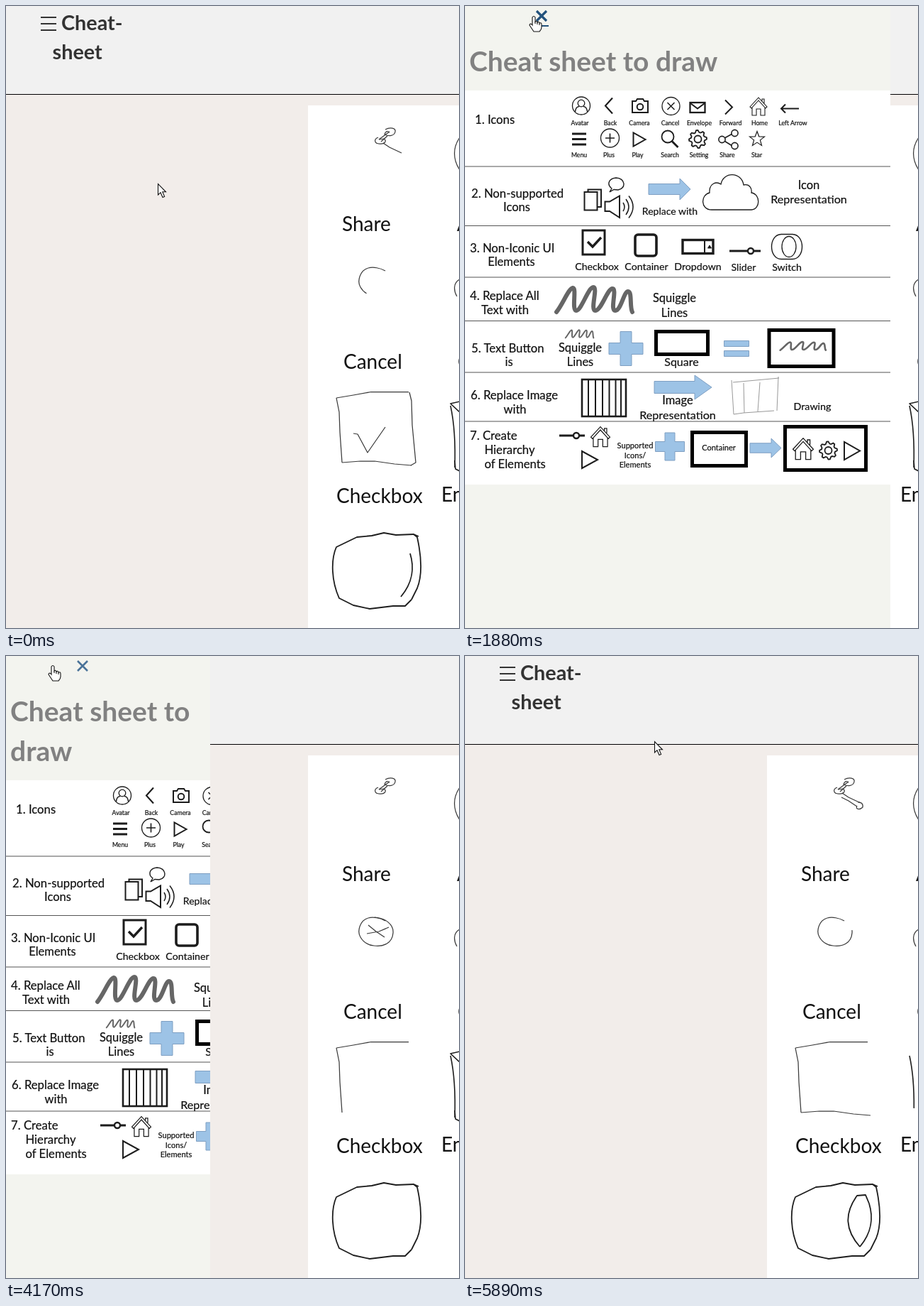
An HTML page that plays this animation: 639x876 px, repeating every 5.98 s.

```html
<!DOCTYPE html>
<html lang="en">
<head>
<meta charset="utf-8">
<title>Cheat sheet panel</title>
<style>
  html, body { margin: 0; width: 100%; height: 100%; overflow: hidden; background: #f2edea; }
  body { position: relative; font-family: Lato, "Open Sans", sans-serif; }
  svg { display: block; font-family: Lato, "Open Sans", sans-serif; }
  #page, #nav, #close, #cursor { position: absolute; left: 0; top: 0; }
  #nav { width: 0; height: 100%; overflow: hidden; background: #f3f4ef; }
  #nav h1 { margin: 50px 0 13.3px; padding-left: 6px; font-size: 39px; line-height: 55.7px; color: #818181; }
  #sheet { background: #fff; fill: none; stroke: #1c1c1c; stroke-linecap: butt; }
  #sheet text { fill: #111; stroke: #111; stroke-width: .2; }
  #sheet .blue { fill: #9dc3e6; stroke: #7f9fc2; stroke-width: 1; }
  #sheet .thick { stroke: #000; stroke-width: 5; }
  #close { stroke: #4a7399; stroke-width: 2.6; fill: none; }
  #close .under { visibility: hidden; }
  #close.hover { stroke: #23527c; stroke-width: 3.2; }
  #close.hover .under { visibility: visible; }
  #cursor { overflow: visible; fill: #fff; stroke: #111; stroke-width: 1.1; }
  #sketch { fill: none; stroke: #3a3a3a; stroke-width: 1.25; stroke-linejoin: round; }
</style>
</head>
<body>
<svg id="page" width="639" height="876">
  <path fill="#f1f1f1" d="M0 0H639V124H0z"/>
  <path fill="#000" d="M0 124H639V125H0z"/>
  <path fill="#fff" d="M426 140H639V876H426z"/>
  <path stroke="#333" stroke-width="2" d="M49 16H71M49 25H71M49 34H71"/>
  <g font-weight="700" font-size="28.8" fill="#333">
    <text x="78" y="34">Cheat-</text><text x="65.5" y="75">sheet</text>
  </g>
  <g font-size="28" fill="#111">
    <text x="474" y="317">Share</text><text x="636" y="317">Avatar</text>
    <text x="476" y="511">Cancel</text><text x="637" y="511">Camera</text>
    <text x="466" y="700">Checkbox</text><text x="614" y="698">Envelope</text>
  </g>
  <g id="sketch"></g>
</svg>
<div id="nav">
  <svg id="close" width="140" height="40">
    <path d="M101 7L115 21M115 7L101 21"/><path class="under" stroke-width="2" d="M97 28H118"/>
  </svg>
  <h1>Cheat sheet to draw</h1>
  <svg id="sheet" width="600" height="555" viewBox="0 119 600 555"></svg>
</div>
<svg id="cursor" width="30" height="30">
  <path id="arrow" d="M.5 .5V16L4 12.7 7 19.5 9.6 18.4 6.8 11.8H11.5z"/>
  <g id="hand">
    <path d="M-2 13V2Q0 -1 2 2V8Q4 6 5 9Q7 7 8 10Q11 9 11 12V16Q11 19 8 22H0L-6 13Q-5 9 -2 13z"/>
    <path fill="none" d="M2 8V11M5 9V12M8 10V13"/>
  </g>
</svg>
<script>
const LOOP = 5980, OPEN = 600, SLIDE = 540;
const $ = id => document.getElementById(id);

// ---- cheat sheet ----
const path = (d, w = 1.3, extra = '') => `<path d="${d}" stroke-width="${w}" ${extra}/>`;
const circle = (x, y, r, w = 1.3, extra = '') => `<circle cx="${x}" cy="${y}" r="${r}" stroke-width="${w}" ${extra}/>`;
const rect = (x, y, w, h, s, rx = 0) =>
  `<rect x="${x}" y="${y}" width="${w}" height="${h}" rx="${rx}" stroke-width="${s}"/>`;
const text = (s, x, mid, size = 16.5, anchor = 'middle') =>
  `<text x="${x}" y="${mid + size * .33}" font-size="${size}" text-anchor="${anchor}">${s}</text>`;
const left = (s, x, mid) => text(s, x, mid, 16.7, 'start');
const blue = d => `<path class="blue" d="${d}"/>`;
const frame = (x, y, w, h) => `<rect class="thick" x="${x}" y="${y}" width="${w}" height="${h}"/>`;
const arrow = (x, y, w, h, head) =>
  blue(`M${x} ${y + h / 4}h${w - head}v${-h / 4}l${head} ${h / 2}l${-head} ${h / 2}v${-h / 4}h${head - w}z`);
const cross = (x, y, w, h, arm) => {
  const a = (w - arm) / 2, b = (h - arm) / 2;
  return blue(`M${x + a} ${y}h${arm}v${b}h${a}v${arm}h${-a}v${b}h${-arm}v${-b}h${-a}v${-arm}h${a}z`);
};
const ring = (x, y, n, radius) => 'M' + Array.from({ length: n }, (_, i) => {
  const a = i / n * 2 * Math.PI - Math.PI / 2, r = radius(i);
  return `${(x + r * Math.cos(a)).toFixed(1)} ${(y + r * Math.sin(a)).toFixed(1)}`;
}).join('L') + 'z';
const gear = (x, y) => path(ring(x, y, 32, i => (i + 1) % 4 < 2 ? 12.5 : 9.6), 1.8) + circle(x, y, 5, 1.8);
const star = (x, y) => path(ring(x, y, 10, i => i % 2 ? 4.6 : 11), 1.2);
const home = (x, y, s) => `<g transform="translate(${x} ${y}) scale(${s})">` +
  path('M-12 1L0 -12L12 1L10 3L0 -8L-10 3zM-9 2V13H-3V4H3V13H9V2M8 -4V-10H5V-7', 1.1) + '</g>';
const play = (x, y, w, h, s) => path(`M${x} ${y}v${h}l${w} ${-h / 2}z`, s);
const slider = (x, y, w, knob) => path(`M${x} ${y}h${w}`, 3) + circle(x + knob, y, 4, 2.4, 'fill="#fff"');
const squiggle = (x, y, sx, sy, w) => `<g transform="translate(${x} ${y}) scale(${sx} ${sy})">` +
  path('M2 37C11 26 19 4 25 3S23 35 30 35S47 2 54 2S49 35 57 35S74 4 81 4S77 35 85 35S97 8 103 8S105 30 109 37',
    w, 'stroke="#666" stroke-linecap="round" vector-effect="non-scaling-stroke"') + '</g>';
const names = (mid, list) => list.map(([s, x]) => text(s, x, mid, 8.7)).join('');

$('sheet').innerHTML = [
  path('M0 226H600M0 309.5H600M0 382H600M0 443.5H600M0 516H600M0 585H600', 1.1, 'stroke="#555"'),

  left('1. Icons', 14, 160),
  circle(164, 140.5, 12.5), circle(164, 137, 4.8), path('M155.5 149Q156 142 161 141.5M172.500 149Q172 142 167 141.500'),
  path('M208 129.500L198 140.500L208 151.500', 2.1),
  path('M236 134h5l2-3h8l2 3h5v16h-22z', 2), circle(247, 142, 4.3, 2),
  circle(290.5, 141, 12.5), path('M285.500 136l10 10m0-10l-10 10', 1.5),
  rect(317.500, 136, 21, 14, 2.3), path('M318 137l10 7.500 10-7.500', 2),
  path('M367 132.500l10 10-10 10', 2),
  home(414, 141, 1), path('M471 144.500H446M452 138.500l-6 6 6 6', 2),
  names(165, [['Avatar', 162], ['Back', 205], ['Camera', 246], ['Cancel', 289.5], ['Envelope', 330.5],
    ['Forward', 374.5], ['Home', 415.5], ['Left Arrow', 462.5]]),
  path('M151 180H171M151 187.500H171M151 195H171', 3),
  circle(204.5, 186, 13), path('M198 186h13m-6.500-6.500v13', 1.6),
  play(237.5, 178.5, 17, 19, 2), circle(286, 184, 8.5, 1.8), path('M292 190.500L300.500 199', 2.8),
  gear(328.5, 187.5),
  path('M377 180L362.500 188L377 197', 1.6),
  [[362.5, 188], [380.5, 179], [380.5, 197]].map(([x, y]) => circle(x, y, 4.6, 1.6, 'fill="#fff"')).join(''),
  star(412, 187.5),
  names(210, [['Menu', 161], ['Plus', 203], ['Play', 243.5], ['Search', 289], ['Setting', 330],
    ['Share', 370], ['Star', 411.5]]),

  left('2. Non-supported', 9, 264), text('Icons', 73, 284),
  path('M173.500 262V258.500H192V283H187M168.500 262H186.500V287.500H168.500z', 2),
  path('M207 257C200 252 202 243 213 242C226 242 228 257 216 259L210 258.500L204 262z', 1.4),
  path('M197.500 275.500H204L218 267.500V298L204 289H197.500z', 2),
  path('M223 277q4 6 0 12M227 272q8 11 0 22M231 267.500q12 15 0 31', 1.5),
  arrow(259, 243, 59, 30, 15), text('Replace with', 289, 289, 14),
  path('M348 287C332 287 332 266 345 263C344 249 355 247 361 251C364 233 390 233 393 252C402 250 405 258 404 263C417 265 417 286 404 287z', 1.3),
  text('Icon', 485, 253), text('Representation', 485, 273, 16.2),

  left('3. Non-Iconic UI', 7, 341), text('Elements', 65.5, 361),
  rect(166, 316, 31, 34, 3), path('M173 332l7 7 12-13', 3.4),
  rect(240, 322, 30, 30, 3.6, 4),
  rect(307, 329.5, 43, 19, 3.4), path('M338 330v18', 2), path('M342.500 341l2.500-4 2.500 4z', 1, 'fill="#111"'),
  slider(373, 345, 44, 30),
  path('M446 321.500H462C480 322 480 356 462 356.500H446C428 356 428 322 446 321.500z', 1.4),
  '<ellipse cx="457" cy="339" rx="10" ry="14.500" stroke-width="1.3"/>',
  text('Checkbox', 186, 367, 14.2), text('Container', 256, 367, 14.2), text('Dropdown', 328.5, 367, 14.2),
  text('Slider', 393, 368, 14.2), text('Switch', 454, 368, 14.2),

  left('4. Replace All', 7, 408), left('Text with', 23, 428.5),
  squiggle(127, 394, 1, 1, 6), text('Squiggle', 295.5, 412), text('Lines', 295.5, 432.5),

  left('5. Text Button', 9, 482), text('is', 62, 502),
  squiggle(141, 455.5, .37, .32, 2), text('Squiggle', 162.5, 481.5), text('Lines', 162.5, 501.5),
  cross(203, 458.5, 48, 48, 16), frame(269.5, 458.5, 73, 32), text('Square', 305.5, 502, 16),
  blue('M365.500 471.500h35v8h-35zM365.500 485.500h35v8h-35z'),
  frame(429, 456.5, 91, 51), squiggle(443.5, 472.5, .6, .33, 2.6),

  left('6. Replace Image', 8, 548.5), text('with', 70.5, 568.5),
  rect(165, 526, 62, 52, 2.6), path('M174 526v52M184 526v52M194 526v52M203.500 526v52M212.500 526v52M220 526v52', 2),
  arrow(267, 520, 81, 34, 24), text('Image', 300, 556), text('Representation', 300, 576.5, 16.2),
  path('M376 527L379 575M378 530L443 524M393 531L394 573M416 530L413 571M442 522L440 570M379 575L393 573L436 570', 1, 'stroke="#999"'),
  text('Drawing', 490, 564, 14.3),

  left('7. Create', 7, 605), left('Hierarchy', 27.5, 625.5), left('of Elements', 27.5, 645),
  slider(133, 605, 36, 24), home(191, 606, 1.12), play(165, 627, 22, 24, 2),
  text('Supported', 240, 619.5, 11.1), text('Icons/', 240, 633, 11.1), text('Elements', 240, 646, 11.1),
  cross(268.5, 601, 41, 39, 14), frame(320.5, 600.5, 76, 47), text('Container', 358, 622.5, 11),
  arrow(402, 609, 44, 27, 14), frame(451.5, 592.5, 114, 61),
  home(477, 623, 1.2), gear(512.5, 626), play(535, 614, 22, 25, 2)
].join('');

// ---- hand-drawn samples: strokes, and [time, strokes drawn] keys ----
const samples = [
  { // share
    strokes: ['M535 174C542 170 550 172 549 177C548 183 540 184 534 181C535 177 538 175 541 178',
      'M541 177L526 188', 'M538 183L529 191',
      'M525 185C518 188 520 194 527 194C534 195 538 190 533 187L526 188',
      'M532 193L541 199L558 207', 'M531 199L541 204L553 212',
      'M553 211C550 216 557 217 561 213C562 208 558 205 554 206'],
    keys: [[0, 5], [1100, 7], [2300, 7], [2301, 0], [2750, 1], [3060, 3], [4160, 4], [5000, 5], [5700, 7]]
  },
  { // cancel
    strokes: ['M535 373C528 369 518 367 511 369C499 372 495 388 500 396C504 403 510 407 519 408C533 410 545 404 546 390C547 378 535 369 520 368',
      'M509 391L526 388L540 382', 'M511 379L522 388L534 396'],
    keys: [[0, .45], [1200, 1], [2500, 1], [2750, 2], [3100, 2], [3800, 3], [4500, 3], [4501, 0], [5890, .78]]
  },
  { // checkbox
    strokes: ['M568 543.500H515L490 548L466 552', 'M466 552L470 572L471 600L474 643',
      'M474 643L500 641L520 641L548 645L572 647', 'M571 647L578 643L573 590L572 556L569 544',
      'M490 602L496 603L510 629L535 593'],
    keys: [[0, 5], [560, 5], [561, 0], [1290, .52], [2750, .85], [3060, 1.22], [4160, 2], [5890, 3]]
  },
  { // switch
    width: 1.8,
    strokes: ['M582 747L575 744L550 745L533 742L516 746L495 748L466 762C458 780 459 810 470 834L490 844L513 849L546 845L563 845L572 836',
      'M572 836L580 820C588 800 586 775 580 748L575 744', 'M570 771C576 790 574 812 557 832',
      'M570 771L565 759L553 760C535 785 536 808 557 832'],
    keys: [[0, 3], [640, 3.85], [720, 4], [1900, 4], [1901, 0], [2750, .88], [3060, 1], [4160, 2], [4950, 2], [5300, 3], [5700, 4]]
  },
  { // envelope
    width: 1.6,
    strokes: ['M627 563C633 590 634 620 633 650', 'M640 572L627 560L640 557', 'M633 640L634 652L640 655'],
    keys: [[0, 3], [800, 3], [801, 0], [1290, 1], [1800, 3], [5500, 3], [5501, 0], [5890, .85]]
  },
  { // camera
    strokes: ['M636 409C631 400 631 390 640 385'],
    keys: [[0, 1], [900, 1], [901, 0], [1290, .35], [1800, 1]]
  },
  { strokes: ['M640 185C630 200 630 215 640 231'], keys: [[0, 1]] } // avatar
];

for (const s of samples) {
  s.lines = s.strokes.map(d => {
    const p = document.createElementNS('http://www.w3.org/2000/svg', 'path');
    p.setAttribute('d', d);
    if (s.width) p.setAttribute('stroke-width', s.width);
    s.width && p.setAttribute('stroke', '#1e1e1e');
    $('sketch').append(p);
    return { p, len: p.getTotalLength() };
  });
}

// Linear value of column c in a table of [time, ...values].
function at(keys, t, c = 1) {
  const i = keys.findIndex(k => k[0] > t);
  if (i < 0) return keys[keys.length - 1][c];
  const a = keys[i - 1], b = keys[i];
  return a[c] + (b[c] - a[c]) * (t - a[0]) / (b[0] - a[0]);
}

// ---- panel ----
const slide = (start, from, to) => [
  { offset: start / LOOP, width: from + 'px', easing: 'ease' },
  { offset: (start + SLIDE) / LOOP, width: to + 'px' }
];
const panel = $('nav').animate([
  { offset: 0, width: '0px' },
  ...slide(1108, 0, OPEN), ...slide(2691, OPEN, 0),
  ...slide(4007, 0, OPEN), ...slide(4916, OPEN, 0),
  { offset: 1, width: '0px' }
], { duration: LOOP, fill: 'both' });
panel.pause();

const pointer = [[0, 214, 250], [160, 210, 243], [640, 72, 22], [800, 66, 13], [1600, 66, 13], [1880, 97, 14],
  [2520, 105, 14], [2800, 105, 14], [3060, 103, 13], [3400, 100, 13], [3700, 66, 13], [4600, 66, 13],
  [4880, 102, 13], [5350, 102, 13], [5890, 267, 120]];

const bursts = [[80, 640, 8], [720, 1290, 8], [1360, 1880, 8], [1960, 2520, 8], [2600, 3140, 8],
  [3220, 3760, 8], [3840, 4400, 8], [4480, 5020, 8], [5100, 5660, 8], [5740, 5890, 3]];
function hold(t) {
  const b = bursts.filter(x => x[0] <= t + 8).pop();
  if (!b) return 0;
  const step = (b[1] - b[0]) / (b[2] - 1);
  return b[0] + step * Math.min(b[2] - 1, Math.floor((t + 8 - b[0]) / step));
}

function draw(t) {
  panel.currentTime = t;
  for (const s of samples) {
    const done = at(s.keys, t);
    s.lines.forEach(({ p, len }, i) => {
      const part = Math.max(0, Math.min(1, done - i));
      p.style.visibility = part ? 'visible' : 'hidden';
      p.style.strokeDasharray = part < 1 ? `${len * part} ${len + 5}` : 'none';
    });
  }
  const x = at(pointer, t, 1), y = at(pointer, t, 2), link = x < 170 && y < 85;
  $('cursor').style.transform = `translate(${x}px, ${y}px)`;
  $('hand').style.display = link ? '' : 'none';
  $('arrow').style.display = link ? 'none' : '';
  $('close').classList.toggle('hover', x > 95);
}

const begin = performance.now();
function tick() {
  draw(hold((performance.now() - begin) % LOOP));
  requestAnimationFrame(tick);
}
tick();
</script>
</body>
</html>
```
